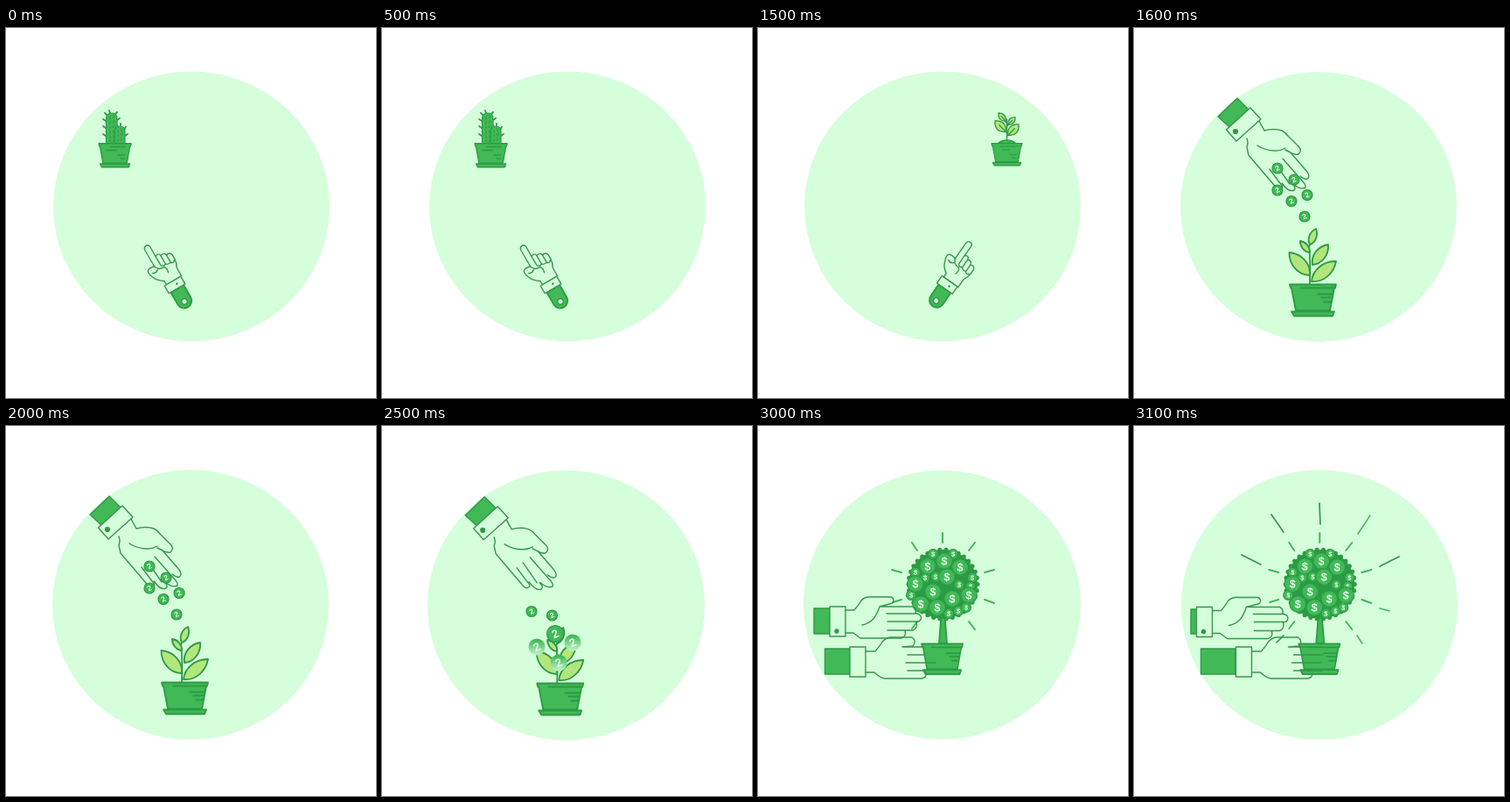
An HTML page that plays this animation: 423x422 px, repeating every 3600 ms.

```html
<!DOCTYPE html>
<html lang="en">
<head>
<meta charset="utf-8">
<title>Growing savings</title>
<style>
  html, body { margin: 0; width: 100%; height: 100%; overflow: hidden; background: #fff; }
  svg { display: block; width: 100%; height: 100%; }
  .slide { animation: show 3.6s step-end infinite; animation-delay: calc(var(--i) * 500ms - 3500ms); }
  .first { animation: none; }
  @keyframes show {
    0% { visibility: visible; }
    13.889%, 100% { visibility: hidden; }
  }
  .disc { fill: #d5feda; }
  .line { fill: none; stroke: #36964c; stroke-width: 1.4; stroke-linecap: round; stroke-linejoin: round; }
  .skin { fill: #d5feda; }
  .solid { fill: #40b956; }
  .dark { fill: #2d9a46; }
  .edge { stroke: #2d9a46; stroke-width: 1.8; stroke-linejoin: round; stroke-linecap: round; }
  .leaf { fill: #b2e67c; }
  .ray { stroke: #43b65a; stroke-width: 2; stroke-linecap: round; fill: none; }
  text { fill: #e2ffe5; font-family: "Liberation Sans", Arial, sans-serif; font-weight: bold; text-anchor: middle; }
</style>
</head>
<body>
<svg viewBox="0 0 423 422" preserveAspectRatio="none">
  <defs>
    <linearGradient id="fade" x1="0" y1="0" x2="0" y2="1">
      <stop offset=".1" stop-color="#40b956"/>
      <stop offset="1" stop-color="#c5f3cb"/>
    </linearGradient>

    <g id="pot" class="solid edge">
      <path d="M0 1H53L52 5H51L46 31H7L2 5H1Z"/>
      <path d="M2 32H51L49 37H5Z"/>
    </g>
    <path id="potLines" class="edge" fill="none" d="M13 5H50M32 12H49M36 16H48M39 21H47"/>

    <g id="plant">
      <path class="edge" fill="none" d="M201 292Q202 265 200 250Q202 240 207 231"/>
      <g id="leaves" class="leaf edge"></g>
      <use href="#pot" x="178" y="291.5"/>
      <use href="#potLines" x="178" y="291.5"/>
    </g>

    <g id="pointer" class="line">
      <path class="skin" d="M193.5 262V239.500Q194 236 197 236Q200.500 236 200.500 239.500V252Q205 249 206 254Q211 252 212 257Q217 255 218 260V265Q218 270 215 275V286H195V281Q188 277 186 271Q183 265 184.500 262Q186 259.500 193.500 261Z"/>
      <path d="M200.500 252V264M206 254V265M212 257V267Q215 269 217 266M206 265Q209 268 212 266M200.500 264Q203 267 206 265M193.500 261Q195 267 201 267Q206 268 204 275M188 267Q192 269 195 266"/>
      <path class="solid edge" d="M195 296H212V312A8.500 8.500 0 0 1 195 312Z"/>
      <rect class="skin" x="192.500" y="286" width="21.500" height="10"/>
      <circle cx="206" cy="291" r=".6"/>
      <circle class="skin" cx="203.300" cy="313" r="3.200"/>
    </g>

    <g id="giver" class="line">
      <path class="solid" d="M118 80L131 93L109 113L96 101Z"/>
      <path class="skin" d="M133 91L145 104L117 129L105.500 116Z"/>
      <circle class="dark" cx="116" cy="118" r="2.400"/>
      <path d="M143 106L149 117Q160 114 169 117Q173 119 176 123L189 136Q192 140 188 144Q184 145 179 142L173 139M129 126Q131 131 129 136L131 145L160 179Q165 186 169 183Q171 181 167 177L155 161M162 155L178 178M169 177Q177 188 183 185Q186 183 181 178M170 149L192 174Q197 179 196 182Q190 185 182 178M179 142L198 164Q202 170 198 172Q195 173 190 169M141 134Q150 140 162 140Q168 140 173 137"/>
    </g>

    <g id="upperHand" class="line">
      <path class="skin" d="M82 206H100V240H82Z"/>
      <circle class="dark" cx="90" cy="234" r="2"/>
      <path d="M100 210H110Q116 203 118 199Q122 195 127 195H152Q157 197 154 202L139 206Q136 215 132 220Q126 226 119 227M139 206H177Q182 208 180 214M147 214H182Q188 216 186 221Q184 224 180 223H148M181 223Q183 231 177 233H148M100 236H109L117 242H163Q170 241 168 233"/>
    </g>

    <g id="lowerHand" class="line">
      <path class="skin" d="M105 252H123V286H105Z"/>
      <path d="M123 257H134Q140 250 142 246Q147 241 152 241H176Q182 245 177 251L165 252M165 252H190M171 261H191M169 270H203M171 279H191M123 281H133Q139 287 145 288H187Q193 287 192 282"/>
    </g>

    <g id="tree">
      <path class="solid edge" d="M209.500 216H213.500L216 248H207Z"/>
      <use href="#pot" transform="translate(187 247.500) scale(.89 .96)"/>
      <use href="#potLines" transform="translate(187 247.500) scale(.89 .96)"/>
      <g id="crown"></g>
      <path class="ray" d="M211 122V133M176 133L182 142M248 133L241 142M153 164L164 167M270 164L259 167M259 198L270 202M241 223L248 232M164 198L154 201M182 223L176 231"/>
    </g>
  </defs>

  <g class="slide first">
    <ellipse class="disc" cx="212" cy="203.500" rx="158" ry="154"/>
    <path class="edge" fill="none" stroke-width="1" d="M115 99L113 97M119 97L118 94M125 98L127 96M114 106L111 104M114 114L111 112M114 123L111 121M127 105L130 103M128 113L126 110M135 116L137 113M136 123L139 121M131 112L131 109"/>
    <g class="solid edge" style="stroke-width:1.2">
      <path d="M114.500 132V104Q114.500 97 121 97Q127 97 127 104V132Z"/>
      <path d="M124 132V118Q124 112 130 112Q136 112 136 118V132Z"/>
      <path fill="none" stroke-dasharray="2.500 3" d="M119 101V130M123 100V130M128 116V130M132 115V130"/>
    </g>
    <use href="#pot" transform="translate(106 131) scale(.7 .75)"/>
    <path class="edge" fill="none" style="stroke-width:1.300" d="M119 135.500H136M115 139.500H127M128 145H136M131 149H136"/>
    <use href="#pointer" transform="translate(.7 -1) rotate(-30 203.300 313)"/>
  </g>

  <g class="slide" style="--i:1">
    <rect width="423" height="422" fill="#fff"/>
    <ellipse class="disc" cx="210.500" cy="204.500" rx="158.500" ry="154.500"/>
    <use href="#plant" transform="translate(187.500 95.500) scale(.64 .65) translate(-178 -229)"/>
    <use href="#pointer"/>
  </g>

  <g class="slide" style="--i:2">
    <rect width="423" height="422" fill="#fff"/>
    <ellipse class="disc" cx="211" cy="203.500" rx="158" ry="154"/>
    <path class="line" d="M284.500 129V104M284 119L277 111M285 123L292 116M284 108L279 101M285 112L290 106"/>
    <g id="sprout" class="leaf edge" style="stroke-width:1.300"></g>
    <path class="solid edge" style="stroke-width:1.300" d="M274 132Q278 128 284.500 128Q291 128 295 132Z"/>
    <use href="#pot" transform="translate(267 131) scale(.66 .7)"/>
    <path class="edge" fill="none" style="stroke-width:1.200" d="M277 135H298M279 139H287M288 144.500H296M290 148H295"/>
    <use href="#pointer" transform="translate(.4 -2) rotate(35 203.300 313)"/>
  </g>

  <g class="slide" style="--i:3">
    <rect width="423" height="422" fill="#fff"/>
    <ellipse class="disc" cx="211" cy="204" rx="158" ry="154"/>
    <use href="#giver"/>
    <use href="#plant"/>
    <g id="falling"></g>
  </g>

  <g class="slide" style="--i:4">
    <rect width="423" height="422" fill="#fff"/>
    <ellipse class="disc" cx="210.500" cy="204.500" rx="158.500" ry="154"/>
    <use href="#giver" x="-.8" y=".8"/>
    <use href="#plant" x="-.8" y="1"/>
    <g id="landing"></g>
  </g>

  <g class="slide" style="--i:5">
    <rect width="423" height="422" fill="#fff"/>
    <ellipse class="disc" cx="210.500" cy="204" rx="158.500" ry="153.500"/>
    <use href="#tree"/>
    <path class="solid line" style="fill:#40b956" d="M64 208H82V237H64ZM76.500 254H105V283H76.500Z"/>
    <use href="#upperHand"/>
    <use href="#lowerHand"/>
  </g>

  <g class="slide" style="--i:6">
    <rect width="423" height="422" fill="#fff"/>
    <ellipse class="disc" cx="212" cy="204" rx="158" ry="154"/>
    <use href="#tree" x="1.300"/>
    <path class="line" style="stroke-width:1.700" d="M212 88L213 112M157 101L171 121M123 147L145 158M303 149L281 160M171 239L163 247"/>
    <path class="ray" style="stroke-width:1.500" d="M270 102L256 123M281 208L292 211M255 239L261 248"/>
    <path class="line" style="fill:#40b956" d="M65 209H74V237H65ZM76.500 254H116V283H76.500Z"/>
    <use href="#upperHand" x="-8.500" y=".5" transform="translate(-2 0)"/>
    <use href="#lowerHand" x="11.500"/>
    <path class="line" d="M200 252H215M200 261H216M200 279H215"/>
  </g>
</svg>
<script>
  const fill = (id, markup) => { document.getElementById(id).innerHTML = markup; };

  // A pointed leaf from base to tip; bulge is its width relative to its length.
  function leaf([x, y, tipX, tipY, bulge]) {
    const dx = tipX - x, dy = tipY - y;
    const at = (along, side) =>
      `${(x + dx * along - dy * side).toFixed(1)} ${(y + dy * along + dx * side).toFixed(1)}`;
    return `<path d="M${x} ${y}C${at(.25, bulge)} ${at(.7, bulge)} ${tipX} ${tipY}` +
      `C${at(.7, -bulge)} ${at(.25, -bulge)} ${x} ${y}Z"/>`;
  }

  function coin([x, y, r, paint = "#40b956"], sign, tilt) {
    return `<g transform="translate(${x} ${y})">
      <circle r="${r}" fill="${paint}" stroke="${paint[0] === "u" ? "none" : "#2d9a46"}" stroke-width="1.2"/>
      <text y="${r * .48}" font-size="${r * 1.4}" transform="rotate(${tilt})">${sign}</text></g>`;
  }

  fill("leaves", [
    [201, 247, 208, 229, .28], [201, 256, 190, 243, .26], [204, 270, 222, 247, .28],
    [201, 282, 177.5, 256, .28], [203, 289, 231, 266, .26]
  ].map(leaf).join(""));

  const sproutLeaves = [
    [283, 118, 271, 106, .38], [286, 122, 298, 110, .38],
    [283, 106, 275, 97, .36], [286, 110, 294, 102, .36]
  ];
  fill("sprout", sproutLeaves.map(leaf).join("") + sproutLeaves.map(([x, y, tipX, tipY]) =>
    `<path d="M${x} ${y}L${x + (tipX - x) * .6} ${y + (tipY - y) * .6}"/>`).join(""));

  fill("falling", [[164, 160], [183, 173], [164, 185], [198, 190.5], [180, 197.5], [195, 215]]
    .map(([x, y]) => coin([x, y, 6], "2", -25)).join(""));

  fill("landing", [
    [171, 211.5, 6], [194.5, 216, 6], [198, 237, 9.5],
    [177, 252, 9.5, "url(#fade)"], [218, 247, 9.5, "url(#fade)"], [202, 270, 9.5, "url(#fade)"]
  ].map(c => coin(c, "2", -25)).join(""));

  const rim = Array.from({ length: 34 }, (_, i) => {
    const a = i / 34 * 2 * Math.PI;
    return `<circle class="dark" cx="${211.5 + 39.5 * Math.cos(a)}" cy="${180.5 + 39.5 * Math.sin(a)}" r="2.5"/>`;
  }).join("");
  const small = [[200, 146], [223, 146], [245, 173], [230, 181], [229, 211], [180, 167],
    [175, 193], [218, 214], [238, 207], [203, 172], [191, 173], [243, 183]];
  const large = [[194, 160], [213, 154], [231, 161], [180, 180], [216, 172], [200, 189],
    [186, 203], [205, 207], [222, 197], [241, 193]];
  fill("crown", rim + `<circle class="dark" cx="211.500" cy="180.500" r="39.500"/>` +
    small.map(([x, y]) => coin([x, y, 5.5], "$", 5)).join("") +
    large.map(([x, y]) => coin([x, y, 9.3], "$", 5)).join(""));
</script>
</body>
</html>
```
